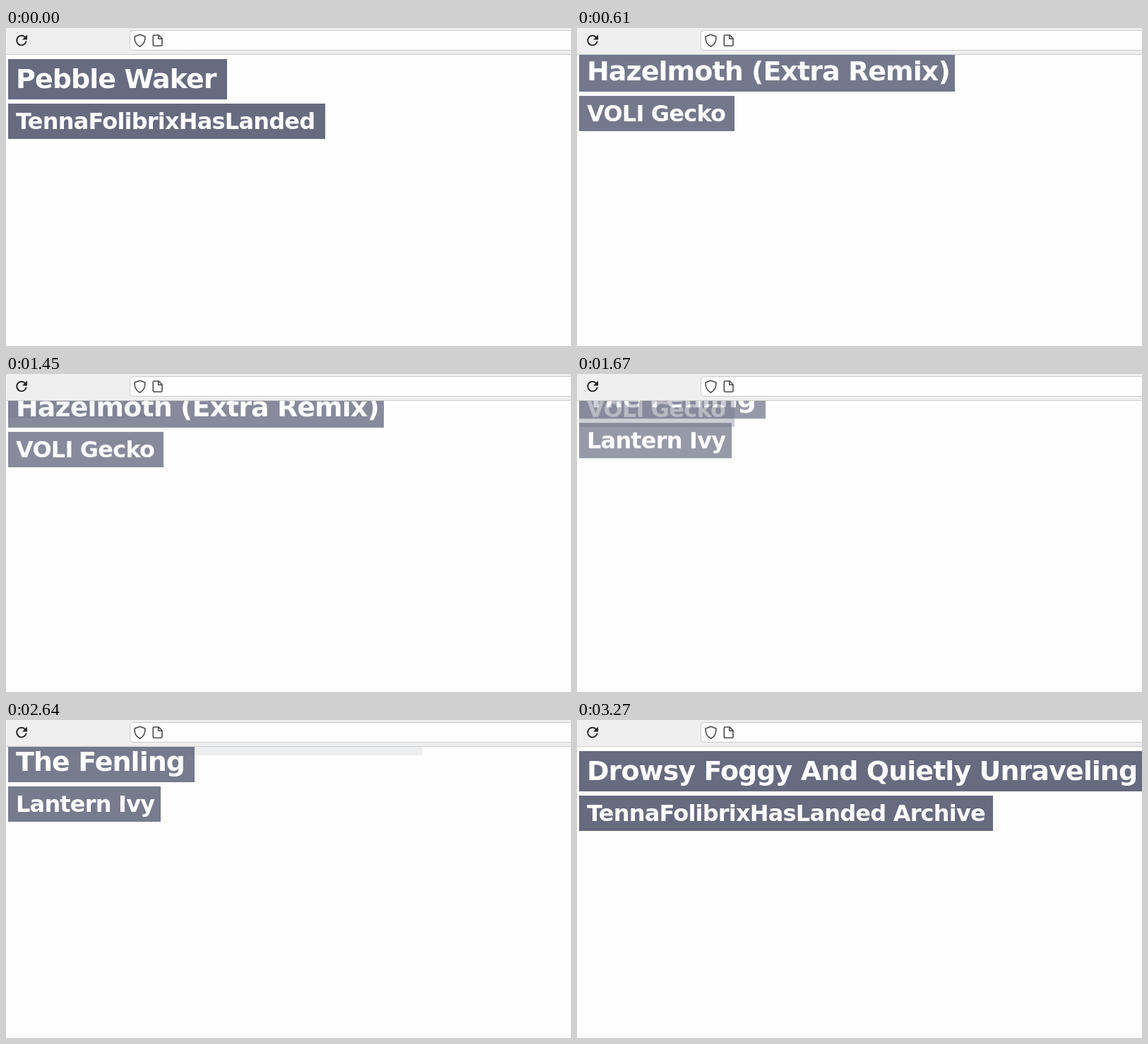
An HTML page that plays this animation: 800x450 px, repeating every 3.39 s.

```html
<!DOCTYPE html>
<html lang="en">
<head>
<meta charset="utf-8">
<title>Now playing</title>
<style>
  html, body { margin: 0; width: 100%; height: 100%; overflow: hidden; background: #fdfefd; }

  .toolbar { position: absolute; z-index: 9; left: 0; top: 0; width: 800px; height: 38px; }

  .card {
    position: absolute; left: 3px; top: 44px;
    animation: 3390ms cubic-bezier(.5, 0, .5, 1) infinite;
    will-change: transform, opacity;
  }
  .card div {
    box-sizing: border-box; width: var(--w); padding-left: 11px;
    background: #666b80; color: #fdfefe;
    font-family: "DejaVu Sans", Verdana, sans-serif; font-weight: 700;
    letter-spacing: -.025em; white-space: nowrap; overflow: hidden;
  }
  .title { height: 57px; font-size: 38px; line-height: 57px; }
  .artist { height: 50px; margin-top: 6px; font-size: 32px; line-height: 50px; }

  /* Each outgoing card lies above the one that replaces it. */
  .first  { z-index: 4; animation-name: first; }
  .second { z-index: 3; animation-name: second; }
  .third  { z-index: 2; animation-name: third; }
  .fourth { z-index: 1; animation-name: fourth; }

  @keyframes first {
    0% { transform: none; opacity: 1; animation-timing-function: cubic-bezier(.45, 0, .48, 1); }
    23.89%, 100% { transform: translateY(-120px); opacity: 0; }
  }
  @keyframes second {
    0% { transform: translateY(-120px); opacity: 0; animation-timing-function: cubic-bezier(.45, 0, .48, 1); }
    23.89%, 34.34% { transform: none; opacity: 1; }
    59.41%, 100% { transform: translateY(-120px); opacity: 0; }
  }
  @keyframes third {
    0%, 34.34% { transform: translateY(-120px); opacity: 0; }
    59.41%, 71.56% { transform: none; opacity: 1; }
    96.64%, 100% { transform: translateY(-120px); opacity: 0; }
  }
  @keyframes fourth {
    0%, 71.56% { transform: translateY(-120px); opacity: 0; }
    96.64%, 100% { transform: none; opacity: 1; }
  }
</style>
</head>
<body>
  <svg class="toolbar" viewBox="0 0 800 38" fill="none">
    <path fill="#efefef" d="M0 0h800v38H0z"/>
    <path stroke="#cfcfcf" d="M0 37.5h800"/>
    <rect x="175.5" y="3.5" width="640" height="28" rx="4" fill="#fefefe" stroke="#cacaca"/>
    <g stroke="#222" stroke-width="1.9">
      <path d="M27.3 13.3A6.8 6.8 0 1 0 28.7 18.6"/>
      <path fill="#222" stroke="none" d="M30 9.5v7h-7z"/>
    </g>
    <g stroke="#4a4a4e" stroke-width="1.6" stroke-linejoin="round">
      <path d="M189.5 9.2l7.4 2.7c.4 6.7-2 11.8-7.4 14.4-5.4-2.6-7.8-7.7-7.4-14.4z"/>
      <path d="M209.8 10h6.4l4.8 4.8v8.900q0 1.500-1.500 1.500h-9.700q-1.500 0-1.500-1.500v-12.200q0-1.500 1.500-1.500zM215.800 10v5.200h5.200"/>
    </g>
  </svg>

  <section class="card first">
    <div class="title" style="--w:310px">Pebble Waker</div>
    <div class="artist" style="--w:449px">TennaFolibrixHasLanded</div>
  </section>
  <section class="card second">
    <div class="title" style="--w:532px">Hazelmoth (Extra Remix)</div>
    <div class="artist" style="--w:220px">VOLI Gecko</div>
  </section>
  <section class="card third">
    <div class="title" style="--w:264px">The Fenling</div>
    <div class="artist" style="--w:216px">Lantern Ivy</div>
  </section>
  <section class="card fourth">
    <div class="title" style="--w:798px">Drowsy Foggy And Quietly Unraveling</div>
    <div class="artist" style="--w:586px">TennaFolibrixHasLanded Archive</div>
  </section>
</body>
</html>
```
